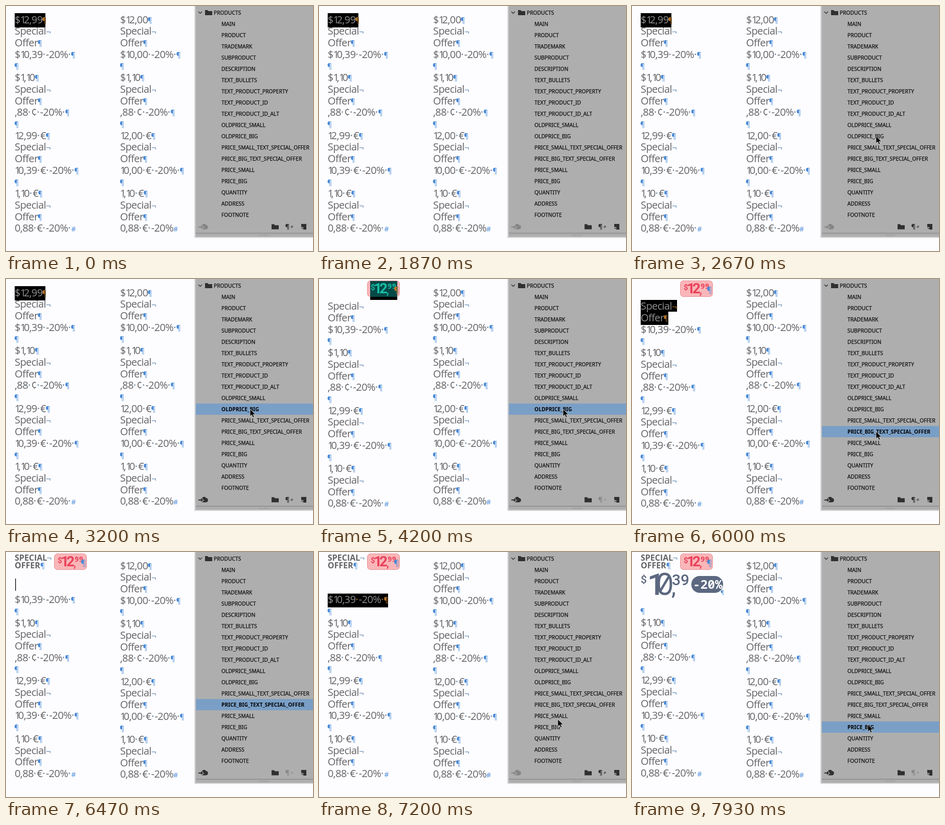
These frames come from a looping animation (600x480 px, 8 s). An HTML page:

```html
<!DOCTYPE html>
<html lang="en">
<head>
<meta charset="utf-8">
<title>Paragraph styles</title>
<style>
  html, body { margin: 0; width: 100%; height: 100%; overflow: hidden; background: #fdfdff; }
  svg { display: block; width: 600px; height: 480px; }
  .copy { font: 20px "Open Sans", "Noto Sans", sans-serif; letter-spacing: -.6px; fill: #646466; }
  .one { letter-spacing: -4.6px; }
  .dot { letter-spacing: 1px; fill: #5b7796; }
  .par, .end { font-size: 14px; letter-spacing: 0; fill: #4a8ad6; }
  .brk { font-size: 17px; fill: #6289b4; }
  .pick { visibility: hidden; }
  .sel .pick { visibility: inherit; }
  .sel text { fill: #8f8f8f; }
  .sel .par, .sel .brk, .sel .dot { fill: #b5752a; }
  .head { font: bold 16px "Open Sans", "Noto Sans", sans-serif; letter-spacing: 0; }
  .num { font-family: Roboto, sans-serif; }
  .mono { font-family: "Noto Sans Mono", monospace; }
  .item { font: 10.25px "Noto Sans", "Open Sans", sans-serif; fill: #111; stroke: #111; stroke-width: .25px; }
  .item.on { font-weight: bold; stroke: none; fill: #000; }
  .icon { fill: #303030; stroke: none; }
  .icon.off { fill: #858585; }
</style>
</head>
<body>
<svg id="stage" viewBox="0 0 600 480"></svg>
<script>
const LOOP = 8000;
const OLD = 3340, DESELECT = 4540, PICK_OFFER = 5600, OFFER = 6200, PICK_PRICE = 7060, PRICE = 7600;
const HIGHLIGHTS = [[2740, DESELECT, 11], [5940, PICK_PRICE, 13], [7330, LOOP, 15]];
const CLEAN = [[OLD, DESELECT], [OFFER, PICK_PRICE], [7870, LOOP]];
// time, x, y
const PATH = [[1930, 497, 228], [2470, 477, 255], [4900, 477, 255], [5150, 477, 277],
  [5700, 477, 277], [5900, 477, 299], [6400, 477, 299], [7100, 477, 310], [7270, 461, 338], [LOOP, 461, 338]];

const items = ('PRODUCTS MAIN PRODUCT TRADEMARK SUBPRODUCT DESCRIPTION TEXT_BULLETS TEXT_PRODUCT_PROPERTY ' +
  'TEXT_PRODUCT_ID TEXT_PRODUCT_ID_ALT OLDPRICE_SMALL OLDPRICE_BIG PRICE_SMALL_TEXT_SPECIAL_OFFER ' +
  'PRICE_BIG_TEXT_SPECIAL_OFFER PRICE_SMALL PRICE_BIG QUANTITY ADDRESS FOOTNOTE').split(' ');

const offer = ['Special¬', 'Offer¶'];
const copy = (first, second, end) => [
  `$${first}¶`, ...offer, `$${second}·-20%·¶`, '¶',
  '$1,10¶', ...offer, ',88·¢·-20%·¶', '¶',
  `${first}·€¶`, ...offer, `${second}·€·-20%·¶`, '¶',
  '1,10·€¶', ...offer, `0,88·€·-20%${end}`];

const marks = { 1: 'one', '·': 'dot', '¶': 'par', '¬': 'brk', '#': 'end' };
const rich = s => s.replace(/[1·¶¬#]/g, c =>
  `<tspan class="${marks[c]}"${c === '¶' ? ' dx="-1" dy="-1"' : ''}>${c}</tspan>`);
const rows = (lines, x, from = 0, to = lines.length) => lines.slice(from, to).map((s, i) =>
  `<text x="${x}" y="${33.5 + 22.72 * (from + i)}">${rich(s)}</text>`).join('');
const box = (x, y, w, h, fill, more = '') =>
  `<rect x="${x}" y="${y}" width="${w}" height="${h}" fill="${fill}" ${more}/>`;
const num = (s, x, y, size, weight = 400, face = 'num') =>
  `<text class="${face}" x="${x}" y="${y}" font-size="${size}" font-weight="${weight}">${s}</text>`;
const par = (x, y, size, fill) =>
  `<text x="${x}" y="${y}" style="font-size:${size}px;fill:${fill}">¶</text>`;

const oldPrice = (ink, mark) => `<g style="letter-spacing:0;fill:${ink}">` +
  num('$', 101, 21, 15, 700) + num('1', 107, 28, 28, 700) + num('2', 118, 28, 28, 700) +
  num(',', 132, 29, 20, 700) + num('99', 134, 19, 14, 700, 'mono') + '</g>' + par(146, 27, 16, mark);

const newPrice = '<g style="letter-spacing:0;fill:#5c6880">' +
  num('$', 17, 61, 21, 500) + num('1', 30, 84, 60, 500) + num('0', 46, 84, 60, 500, 'mono') +
  num(',', 77, 84, 40, 500) + num('39', 78, 64.5, 30, 500) +
  box(116, 47, 62, 33, '#5c6880', 'rx="16"') +
  '<g fill="#fdfdff">' + num('-20%', 119, 72, 24, 700, 'mono') + '</g></g>' +
  par(173, 83, 11, '#4a8ad6');

const folder = (x, y) => `<path class="icon" d="M${x} ${y}h5l1.5 2h7.5v8h-14z"/>`;
const left = copy('12,99', '10,39', '·#');
const right = copy('12,00', '10,00', '#');
const stage = document.getElementById('stage');

stage.innerHTML = `
  ${box(0, 0, 600, 480, '#fdfdff')}
  <g class="copy">${rows(right, 223)}</g>
  <g class="copy">
    <g id="r0" class="sel">${box(17, 14, 60, 28, '#000', 'class="pick"')}${rows(left, 17, 0, 1)}</g>
    <g id="r1">${box(17, 37, 71, 23, '#000', 'class="pick"')}${box(17, 60, 54, 26, '#000', 'class="pick"')}${rows(left, 17, 1, 3)}</g>
    <g id="r3">${box(17, 83, 118, 27, '#000', 'class="pick"')}${rows(left, 17, 3, 4)}</g>
    <g id="rest">${rows(left, 17, 4)}</g>
  </g>
  <g class="copy" id="tag">
    ${box(94.5, 3.5, 63, 31, '#fab6b8', 'rx="6" stroke="#cf4a50" stroke-dasharray="1.5 1.5"')}
    ${oldPrice('#e8435c', '#4a8ad6')}
    <g id="tagSel">${box(100, 4, 53, 37, '#000')}${box(100, 4, 53, 31, '#054947')}${oldPrice('#17bca3', '#b5752a')}</g>
  </g>
  <g class="copy" id="head">
    <text class="head" x="17" y="17">SPECIAL<tspan class="brk" font-weight="400" dx="-1">¬</tspan></text>
    <text class="head" x="17" y="32">OFFER<tspan class="par" font-weight="400">¶</tspan></text>
  </g>
  <g class="copy" id="price">${newPrice}</g>
  ${box(18, 52, 1.3, 24, '#000', 'id="caret"')}

  ${box(367.5, -5, 240, 460, '#ededf0')}
  ${box(369, -5, 240, 458.5, '#c6c6c8')}
  ${box(371, 0, 229, 452, '#aeaeae')}
  ${box(371, 444.5, 229, 1.5, '#8c8c8c')}
  <path d="M495 448.5h20M496 450.5h18" stroke="#8b8b8b" stroke-dasharray="1 1.5"/>
  ${box(371, 0, 229, 22, '#7a9fc6', 'id="bar"')}
  <path d="M376 11l3.5 3.5 3.5-3.5" fill="none" stroke="#303030" stroke-width="1.3"/>
  ${folder(389, 8)}
  ${items.map((s, i) => `<text class="item" x="${i ? 421 : 406}" y="${16.8 + 22 * i}">${s}</text>`).join('')}
  <path id="cloud" class="icon" d="M376 432h5v-2.500l4.500 3.500-4.500 3.500v-2.500h-5zM383 437.500l4-4-4-4a4.500 4.500 0 0 1 8-.5a4.300 4.300 0 0 1 .3 8.500z"/>
  ${folder(519, 427.500)}
  <g id="style" class="icon" style="font-family:'Open Sans','Noto Sans',sans-serif">
    <text x="545.5" y="436.5" font-size="13" font-weight="700">¶</text>
    <text id="sign" x="556" y="436" font-size="10">≠</text>
  </g>
  <path class="icon" d="M577 427h10v11h-6v-5h-4z"/><path class="icon" d="M577 434.500h3v3z"/>
  <path id="cursor" d="M0 0V14L3.300 11 5.600 16.200 8 15.200 5.800 10.200H10.300Z" stroke="#d6d6d6" stroke-width=".8"/>`;

const $ = id => document.getElementById(id);
const labels = stage.querySelectorAll('.item');
const within = (t, a, b = LOOP) => t >= a && t < b;
const show = (id, on) => $(id).setAttribute('visibility', on ? 'visible' : 'hidden');
const move = (id, x, y) => $(id).setAttribute('transform', `translate(${x} ${y})`);
const ease = p => p * p * (3 - 2 * p);

function pointer(t) {
  const i = Math.max(1, PATH.findIndex(k => k[0] > t));
  const [t0, x0, y0] = PATH[i - 1], [t1, x1, y1] = PATH[i];
  const p = ease(Math.min(1, Math.max(0, (t - t0) / (t1 - t0))));
  return [x0 + (x1 - x0) * p, y0 + (y1 - y0) * p];
}

function draw(t) {
  show('r0', t < OLD);
  show('r1', t < OFFER);
  show('r3', t < PRICE);
  $('r1').classList.toggle('sel', within(t, PICK_OFFER, OFFER));
  $('r3').classList.toggle('sel', within(t, PICK_PRICE, PRICE));
  const shift = t < OLD ? 0 : t < OFFER ? 4 : t < PRICE ? -1.5 : -2.3;
  for (const id of ['r1', 'r3', 'rest']) move(id, 0, shift);

  show('tag', t >= OLD);
  show('tagSel', within(t, OLD, DESELECT));
  show('head', t >= OFFER);
  show('caret', within(t, OFFER, PICK_PRICE));
  show('price', t >= PRICE);

  const hit = HIGHLIGHTS.find(h => within(t, h[0], h[1]));
  const row = hit ? hit[2] : -1;
  show('bar', hit);
  move('bar', 0, 2 + 22 * row);
  labels.forEach((l, i) => l.classList.toggle('on', i === row));
  const clean = CLEAN.some(c => within(t, c[0], c[1]));
  $('cloud').classList.toggle('off', !hit);
  $('style').classList.toggle('off', clean);
  $('sign').textContent = clean ? '+' : '≠';

  show('cursor', within(t, 1930, 6400) || t >= 7100);
  $('cursor').style.opacity = Math.min(1, Math.max(0, (t - 1900) / 130));
  move('cursor', ...pointer(t));
}

const start = performance.now();
function tick() {
  draw((performance.now() - start) % LOOP);
  requestAnimationFrame(tick);
}
tick();
</script>
</body>
</html>
```
